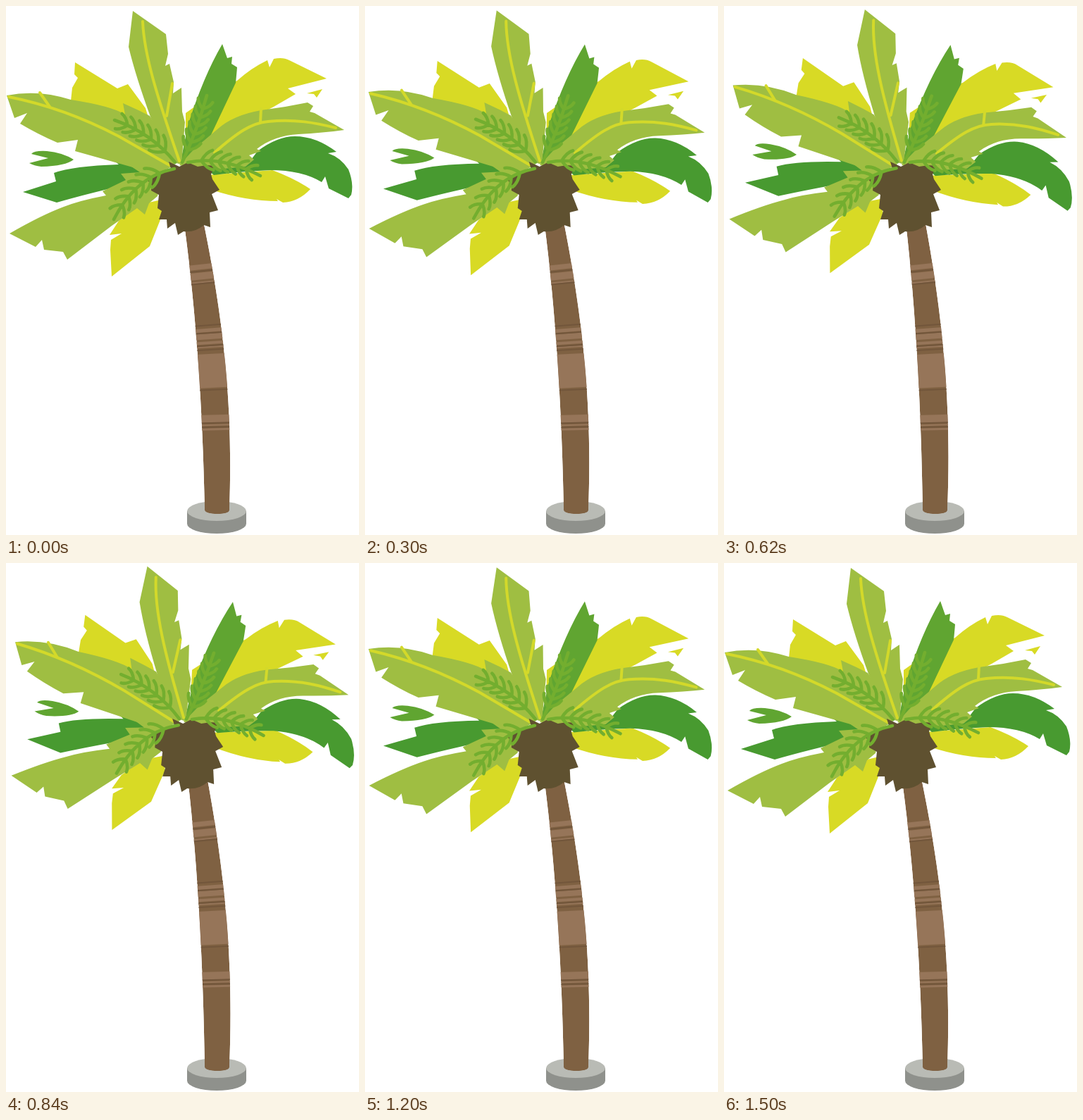
An HTML page for the animation above (1520 ms loop, 501 by 751 pixels).

```html
<!DOCTYPE html>
<html lang="en">
<head>
<meta charset="utf-8">
<title>Palm tree</title>
<style>
  html, body { margin: 0; width: 100%; height: 100%; overflow: hidden; background: #fff; }
  svg { display: block; width: 501px; height: 751px; }
  .line { fill: none; stroke-linecap: round; stroke-linejoin: round; }
</style>
</head>
<body>
<svg id="stage" viewBox="0 0 501 751">
  <path d="M257,717V735A42,14 0 0 0 341,735V717Z" fill="#8f918c"/>
  <ellipse cx="299" cy="717" rx="42" ry="14" fill="#b9bbb5"/>
  <clipPath id="bark"></clipPath>
  <g id="leaves"></g>
  <g id="trunk" clip-path="url(#bark)"></g>
  <g id="front"></g>
</svg>
<script>
const LOOP = 1520, HALF = 750, STEP = 20;
const LIGHT = '#9fbe42', YELLOW = '#d8da25', MID = '#60a531', DARK = '#489a30', FERN = '#73ae2f';
const TRUNK = '#7f6142', RING = '#967559', GROOVE = '#72563b', CROWN = '#5f5130';
const byId = id => document.getElementById(id);
const moving = [];

function add(parent, attrs) {
  const el = document.createElementNS('http://www.w3.org/2000/svg', 'path');
  for (const k in attrs) el.setAttribute(k, attrs[k]);
  byId(parent).append(el);
  return el;
}

function shape(parent, d, fill, warp) {
  moving.push({ el: add(parent, { d, fill }), d, warp });
}

function line(parent, d, stroke, width, warp) {
  moving.push({ el: add(parent, { d, stroke, 'stroke-width': width, class: 'line' }), d, warp });
}

// Displacements at full sway. A leaf tip may swing a little further round the crown.
const sway = (turn = 0) => (x, y) => {
  const u = (x - 260) / 100, v = (y - 260) / 100;
  const swing = turn * ((x - 260) ** 2 + (y - 235) ** 2) / 40000;
  return [
    4.5 - 3.3 * v - 0.4 * v ** 3 - 0.7 * u - swing * (y - 235),
    u * (3.4 + 0.4 * u * u + 0.4 * v) + swing * (x - 260)
  ];
};
const bend = (x, y) => [5 * Math.max(0, (720 - y) / 400) ** 2, 0];
const shift = () => [5, 0];

const leaf = (d, fill, turn) => shape('leaves', d, fill, sway(turn));
const vein = d => line('leaves', d, '#d3d92a', 4, sway());

leaf('M98,80L158,117L173,111L198,145L215,200L150,170L92,135L94,116L102,102L97,97Z', YELLOW);
leaf('M255,180L255,152L300,120L328,106Q348,88 371,77L374,87L380,75Q393,72 402,77L455,103L400,117L411,125L380,143L300,185L260,210Z', YELLOW, 0.014);
leaf('M427,124L449,118L441,130L437,125Z', YELLOW);
leaf('M285,240L378,233Q410,245 432,260Q415,278 393,279L384,274L386,277Q340,277 292,261Z', YELLOW);
leaf('M150,384L148,346L149,332L164,323L147,325L160,305L190,282L220,275L222,296L204,341Z', YELLOW);
leaf('M307,54L314,74L321,72L320,82L328,87Q327,100 326,109L290,185L247,225L258,170Q280,100 307,54Z', MID);
leaf('M285,232L345,222L357,206Q385,185 410,185Q440,185 469,207L457,209Q475,215 486,232Q494,252 490,268L486,273L458,259L453,242L448,250Q420,233 375,233Q330,235 295,240Z', DARK, 0.018);
leaf('M24,264L71,249L68,237Q95,227 160,225L152,218L195,228L215,235L200,248L165,255Q110,268 72,279Z', DARK);
leaf('M36,210Q40,205 58,206Q80,208 96,218Q85,227 50,228Q40,227 33,223L60,216Z', MID);
leaf('M5,323Q50,297 82,285Q105,276 142,269L137,263L170,247L163,238L190,236L172,224L225,232L215,270L203,280L197,296L186,287L150,312L87,360L81,349L54,346L51,332L42,342Z', LIGHT, 0.01);
leaf('M480,176L438,152L431,150L436,142L428,137Q395,144 362,148Q322,155 300,175L268,202L246,226L262,230L300,232L340,228L352,218L345,212L362,206L356,203Q380,184 415,182Q450,180 480,176Z', LIGHT);
leaf('M1,127Q46,118 92,133Q150,142 169,154L166,138L188,148L204,156L225,190L240,226L215,238L180,229L98,206L102,190L73,194Q45,182 20,167L30,152L12,159Z', LIGHT);
leaf('M180,7L227,40L230,68L226,85L232,82L238,108L237,124L249,116L250,150L254,165L249,225L238,222L206,160Q184,100 174,58Z', LIGHT);
vein('M4,129C70,142 120,164 160,185L232,226');
vein('M48,123L62,143');
vein('M194,22C196,70 215,130 246,220');
vein('M236,110L228,156');
vein('M296,208C328,180 348,166 372,164C410,160 440,166 468,173');
vein('M362,146L361,165');

const bark = 'M253,310C268,420 279,560 282,716Q284,721 300,721Q316,721 317,716C321,600 316,480 280,305Z';
shape('bark', bark, '#000', bend);
shape('trunk', bark, TRUNK, bend);
function ring(y, h, stroke) {
  const tilt = (660 - y) / 60;
  add('trunk', { d: `M245,${y + tilt}L335,${y - tilt}`, stroke, 'stroke-width': h });
}
for (const [y, h] of [[369, 7], [382, 10], [391, 2], [460, 5], [469, 8], [478, 4], [484, 2], [518, 48], [586, 11], [595, 2], [601, 3]])
  ring(y, h, RING);
for (const y of [375, 393, 453, 464, 482, 488, 545, 592, 598]) ring(y, 2, GROOVE);

shape('front', 'M200,246L215,236L234,231L231,221L246,228L258,222L272,228L285,226L296,227L291,239L293,246L303,261L292,267L301,290L289,293L290,314L281,311Q268,322 252,320L244,325L240,308L229,316L228,303L217,303L221,291L215,287L217,268L206,262L207,255Z', CROWN, shift);

// Curved stem with hooked leaflets on both sides, shrinking towards the tip.
function fern(x0, y0, cx, cy, x1, y1, pairs, size) {
  const f = n => n.toFixed(1);
  let d = `M${x0},${y0}Q${cx},${cy} ${x1},${y1}`;
  for (let i = 0; i < pairs; i++) {
    const t = 0.2 + 0.74 * i / pairs, q = 1 - t;
    const x = q * q * x0 + 2 * q * t * cx + t * t * x1;
    const y = q * q * y0 + 2 * q * t * cy + t * t * y1;
    const dir = Math.atan2(q * (cy - y0) + t * (y1 - cy), q * (cx - x0) + t * (x1 - cx));
    const len = size * (1 - 0.3 * t);
    for (const side of [-1, 1]) {
      const at = (r, a) => `${f(x + r * Math.cos(dir + side * a))},${f(y + r * Math.sin(dir + side * a))}`;
      d += `M${f(x)},${f(y)}Q${at(len * 0.65, 1)} ${at(len, 0.7)}`;
    }
  }
  line('front', d, FERN, 4.6, sway());
}
fern(240, 222, 206, 180, 154, 162, 6, 24);
fern(250, 222, 270, 180, 285, 127, 6, 22);
fern(258, 222, 305, 212, 361, 241, 6, 23);
fern(239, 231, 184, 242, 153, 303, 6, 24);

function draw(now) {
  const t = Math.floor(now % LOOP / STEP) * STEP;
  const p = Math.max(0, 1 - Math.abs(t - HALF) / HALF);
  const ease = p < 0.5 ? 2 * p * p : 1 - 2 * (1 - p) ** 2;
  const s = ease * 1.064;
  for (const { el, d, warp } of moving)
    el.setAttribute('d', d.replace(/([\d.]+),([\d.]+)/g, (_, a, b) => {
      const x = +a, y = +b, [dx, dy] = warp(x, y);
      return `${(x + s * dx).toFixed(2)},${(y + s * dy).toFixed(2)}`;
    }));
  requestAnimationFrame(draw);
}
draw(performance.now());
</script>
</body>
</html>
```
